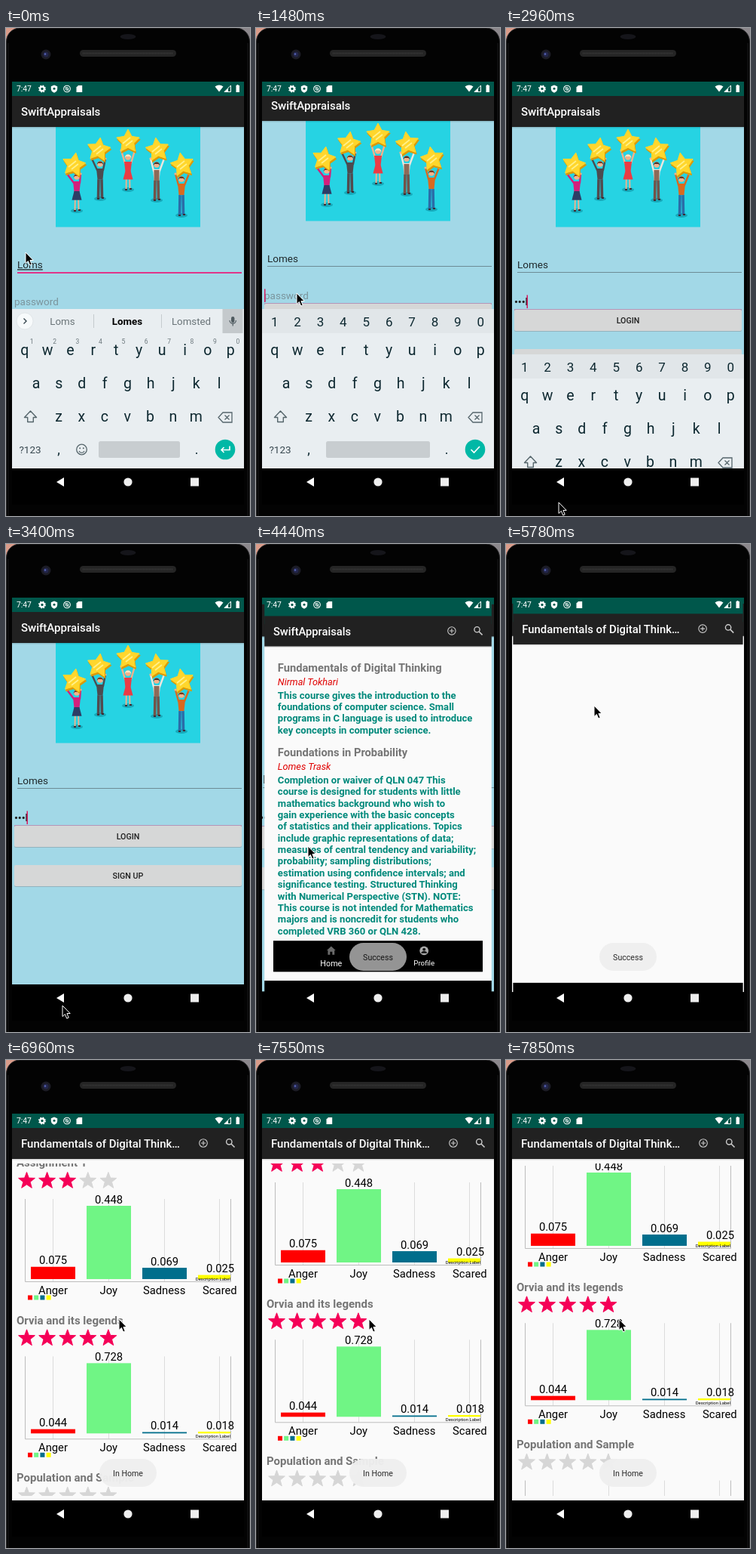
Write an HTML page that moves like this. It is 324 px wide and 646 px high and loops after 8 s.

```html
<!DOCTYPE html>
<html lang="en">
<head>
<meta charset="utf-8">
<title>Course feedback app</title>
<style>
html, body { margin: 0; width: 100%; height: 100%; overflow: hidden; background: #000; }
svg { display: block; width: 100%; height: 100%; font-family: Roboto, sans-serif; }
text { white-space: pre; }
</style>
</head>
<body>
<svg id="stage" viewBox="0 0 324 646"></svg>
<script>
const LOOP = 8000, TICK = 148;
const APP = 'SwiftAppraisals';

// ---- drawing helpers (text y is the visual middle of the line) ----
const text = (x, y, str, size, fill, more = '') =>
  `<text x="${x}" y="${y + size * 0.35}" font-size="${size}" fill="${fill}" ${more}>${str}</text>`;
const MID = 'text-anchor="middle"', BOLD = 'font-weight="700"', MEDIUM = 'font-weight="500"';
const rect = (x, y, w, h, fill, more = '') =>
  `<rect x="${x}" y="${y}" width="${w}" height="${h}" fill="${fill}" ${more}/>`;
const circle = (x, y, r, fill, more = '') => `<circle cx="${x}" cy="${y}" r="${r}" fill="${fill}" ${more}/>`;
const path = (d, fill, more = '') => `<path d="${d}" fill="${fill}" ${more}/>`;
const line = (d, color, w = 1, more = '') => path(d, 'none', `stroke="${color}" stroke-width="${w}" ${more}`);
const group = (id, body, more = '') => `<g id="${id}" ${more}>${body}</g>`;
const each = (list, fn) => [...list].map(fn).join('');

function star(x, y, r, fill, inner = 0.42, tilt = 0) {
  const pts = Array.from({ length: 10 }, (_, i) => {
    const a = (i * 36 - 90 + tilt) * Math.PI / 180, q = i % 2 ? r * inner : r;
    return (x + q * Math.cos(a)).toFixed(1) + ',' + (y + q * Math.sin(a)).toFixed(1);
  });
  return `<polygon points="${pts.join(' ')}" fill="${fill}" stroke="${fill}" stroke-width="1" stroke-linejoin="round"/>`;
}

// ---- phone ----
const phone = rect(0, 0, 162, 646, '#d99c8a') + rect(162, 0, 162, 646, '#8b878b') +
  rect(0.5, 0, 323, 680, '#030303', 'rx="18" stroke="#2c2c2e"') +
  line('M3 20V646M321 20V646', '#1b1b1d') +
  `<ellipse cx="162" cy="11.5" rx="10.5" ry="3.5" fill="#15151a"/>` +
  rect(98, 29, 128, 9, '#252525', 'rx="4.5"') + line('M102 33.5H222', '#3b3b3b', 2, 'stroke-dasharray="1 1"') +
  circle(53, 35, 6.5, '#1c1c25') + circle(53, 35, 3.5, '#23264a') + circle(52, 34.5, 1.3, '#5663b4');

// Bands overlap so that no seam shows while a window is scaled.
const appWindow = (id, title, bg, body, icons = '') => group(id,
  rect(8, 71, 308, 30, '#00574b') + rect(8, 125, 308, 460, bg) + rect(8, 583, 308, 60, '#000') + body +
  rect(8, 90, 308, 41, '#212121') + rect(8, 131, 308, 1.5, '#000', 'opacity=".12"') +
  text(20, 110.5, title, 15, '#fff', MEDIUM) + icons);

const barIcons = circle(262, 110, 5.3, 'none', 'stroke="#ccc" stroke-width="1.1"') +
  line('M262 107v6M259 110h6', '#ccc', 1.1) +
  circle(296.3, 108.3, 3.7, 'none', 'stroke="#ccc" stroke-width="1.4"') + line('M299 111l4.5 4.5', '#ccc', 1.6);

// ---- login screen ----
function person(x, head, foot, top, legs, hair, starX, starY, skirt, tilt) {
  const neck = head + 6, waist = neck + (foot - neck) * 0.36, hem = neck + (foot - neck) * 0.66;
  const skin = '#f3b18c', sleeve = top === legs ? skin : top;
  return `<ellipse cx="${x}" cy="${foot}" rx="8" ry="3" fill="#16a9ba"/>` +
    line(`M${x - 2} ${waist}L${x - 2.5} ${foot}M${x + 2} ${waist}L${x + 2.5} ${foot - 1}`, skirt ? skin : legs, skirt ? 1.8 : 3.6) +
    line(`M${x - 4} ${foot}h3M${x + 2} ${foot - 1}h3`, '#3a2d35', 2) +
    line(`M${x - 4} ${neck + 2}L${starX - 9} ${starY + 12}M${x + 4} ${neck + 2}L${starX + 9} ${starY + 12}`, sleeve, 2.4, 'stroke-linecap="round"') +
    circle(starX - 9, starY + 12, 1.6, skin) + circle(starX + 9, starY + 12, 1.6, skin) +
    path(`M${x - 5} ${neck}h10l-1.500 ${waist - neck}h-7z`, top) +
    (skirt ? path(`M${x - 3.5} ${waist - 1}h7l3 ${hem - waist}h-13z`, legs) : '') +
    circle(x, head, 3.8, skin) + path(`M${x - 4.3} ${head + 1}a4.3 4.6 0 0 1 8.600 0l-2 -2h-5z`, hair) +
    star(starX + 1, starY + 2.5, 16, '#dc9a08', 0.52, tilt) + star(starX, starY, 16, '#ffd62c', 0.52, tilt) +
    line(`M${starX - 7} ${starY + 3}l10 -8M${starX - 3} ${starY + 6}l9 -7`, '#fff08a', 1.8);
}
const picture = rect(66, 125, 192, 138.500, '#26d3e3') +
  person(94, 197, 242, '#d3207c', '#2d3d66', '#6b2b3a', 90, 181, true, 10) +
  person(125, 180, 226, '#4c4b50', '#514b4f', '#6a3f2b', 123, 161, false, 8) +
  person(162, 171, 214, '#ea3b45', '#ea3b45', '#f6e9c8', 162, 150, true, 0) +
  person(200, 181, 228, '#eee6df', '#71544a', '#4a332c', 201, 161, false, -8) +
  rect(196.5, 188, 7, 14, '#8d6a58') +
  person(233, 200, 248, '#d9691f', '#2a6da8', '#6b3a22', 234, 181, false, -10);

const button = (y, label, id) => rect(11, y + 0.5, 302, 28.5, '#93b3bd', 'rx="2"') +
  rect(11, y, 302, 28, '#d6d7d7', `rx="2" id="${id}"`) + text(162, y + 13.8, label, 10.7, '#1f1f1f', MID + ' ' + MEDIUM);

const login = appWindow('login', APP, '#a2d8e7', picture +
  text(15, 313.5, '', 13.5, '#20292c', 'id="user"') +
  rect(15, 323, 298, 1, '#6d8c95', 'id="userLine"') +
  text(11, 362.7, '', 13.5, '#222', 'id="pass"') +
  rect(11, 353.5, 1.5, 17.5, '#d81b60', 'id="caret"') +
  rect(11, 372.3, 302, 2, '#d81b60', 'id="passLine" opacity=".5"') +
  button(373, 'LOGIN', 'loginButton') + button(425, 'SIGN UP', 'signUpButton'));

// ---- keyboard ----
const INK = '#0d2830', keyX = i => 24.7 + i * 30.4;
const keyRow = (keys, x, y) => each(keys, (c, i) => text(x + i * 30.4, y, c, 19.5, INK, MID));
const keyboard = rect(8, 372, 308, 211, '#e9eef1') +
  keyRow('qwertyuiop', 24.7, 426.3) + keyRow('asdfghjkl', 40, 469.8) + keyRow('zxcvbnm', 70, 514.3) +
  line('M32.5 507l-8 8.5h4.2v6h7.6v-6h4.2z', '#56666c', 1.4, 'stroke-linejoin="round"') +
  line('M288 509h12v13h-12l-6 -6.5zM290.500 512.500l6 6m0 -6l-6 6', '#56666c', 1.3) +
  text(32, 558, '?123', 13.5, '#37474f', MID) + text(70, 558, ',', 18, INK, MID) + text(253, 558, '.', 18, INK, MID) +
  circle(291, 558, 13.3, '#00b8a6') +
  group('wordKeys',
    each('1234567890', (c, i) => text(keyX(i) + 9.5, 415, c, 8.5, '#6b777c', MID)) +
    circle(25, 388, 11, '#f7fafb', 'stroke="#d5dadd" stroke-width=".6"') + line('M23.500 384.500l3.500 3.500l-3.500 3.500', '#37474f', 1.4) +
    text(75, 388.5, '', 13.3, '#6a7478', MID + ' id="hint0"') + text(161, 388.5, '', 13.3, '#000', MID + ' ' + BOLD + ' id="hint1"') +
    text(246, 388.5, '', 13.3, '#6a7478', MID + ' id="hint2"') +
    line('M116.5 379v18M206.5 379v18', '#c5cbce') + rect(287.5, 372, 27, 32, '#c4c9cc') +
    rect(299, 382, 4.4, 8, '#4f5b60', 'rx="2.2"') + line('M297 387a4.200 4.200 0 0 0 8.400 0M301.200 391.500v3', '#4f5b60', 1.2) +
    circle(100.5, 558, 6.8, 'none', 'stroke="#56666c" stroke-width="1.3"') + circle(98.2, 556.3, 1, '#56666c') + circle(102.8, 556.3, 1, '#56666c') +
    line('M97 560a3.800 3.800 0 0 0 7 0', '#56666c', 1.2) + rect(123, 547, 108, 22, '#c8cdd0', 'rx="2.5"') +
    line('M297 553.500v5h-11m3.500 -3.500l-3.500 3.500l3.500 3.500', '#fff', 1.6)) +
  group('passKeys', rect(8, 372, 308, 32, '#e1e6e9') +
    each('1234567890', (c, i) => text(keyX(i), 388.7, c, 17, INK, MID)) + rect(93, 547, 138, 22, '#c8cdd0', 'rx="2.5"') +
    line('M285.500 558l4 4l7.500 -8', '#fff', 1.7));

// ---- course list ----
const courses = [
  [160, 'Fundamentals of Digital Thinking', 'Nirmal Tokhari', [
    'This course gives the introduction to the', 'foundations of computer science. Small',
    'programs in C language is used to introduce', 'key concepts in computer science.']],
  [274.5, 'Foundations in Probability', 'Lomes Trask', [
    'Completion or waiver of QLN 047 This', 'course is designed for students with little',
    'mathematics background who wish to', 'gain experience with the basic concepts',
    'of statistics and their applications. Topics', 'include graphic representations of data;',
    'measures of central tendency and variability;', 'probability; sampling distributions;',
    'estimation using confidence intervals; and', 'significance testing. Structured Thinking',
    'with Numerical Perspective (STN). NOTE:', 'This course is not intended for Mathematics',
    'majors and is noncredit for students who', 'completed VRB 360 or QLN 428.']]
];
const courseCard = ([y, name, teacher, about]) => text(26, y, name, 15, '#757575', BOLD) +
  text(26, y + 19.4, teacher, 13, '#e00000', 'font-style="italic"') +
  each(about, (s, i) => text(26, y + 37 + i * 15.7, s, 13.35, '#00897b', BOLD));
const tabs = rect(20, 529, 284, 42, '#000') +
  path('M92.500 542l6 -5.500l6 5.500h-1.500v6h-3v-4h-3v4h-3v-6z', '#6a6a6a') + text(98.5, 559.5, 'Home', 11, '#fff', MID) +
  circle(224.5, 542.5, 6, '#aaa') + circle(224.5, 540.7, 2, '#111') + path('M220.500 546a4 3 0 0 1 8 0z', '#111') +
  text(224.5, 559.5, 'Profile', 10, '#fff', MID);
const home = appWindow('home', APP, '#fafafa', each(courses, courseCard) + tabs, barIcons);

// ---- feedback charts ----
const MOODS = [['Anger', '#f00'], ['Joy', '#70f585'], ['Sadness', '#006e8c'], ['Scared', '#ff0']];
const reviews = [
  { name: 'Assignment 1', stars: 3, base: 154, scale: 216.5, values: [0.075, 0.448, 0.069, 0.025] },
  { name: 'Orvia and its legends', stars: 5, base: 150, scale: 127.7, values: [0.044, 0.728, 0.014, 0.018] },
  { name: 'Population and Sample', stars: 0, values: [] }
];
function review({ name, stars, base, scale, values }, i) {
  const axis = 157;
  const bars = each(values, (v, j) => {
    const x = 33 + j * 74, h = v * scale;
    return rect(x, base - h, Math.min(59, 298 - x), h, MOODS[j][1]) +
      text(x + 29.5, base - h - 8.5, v.toFixed(3), 14.8, '#000', MID);
  });
  return `<g transform="translate(0 ${149 + i * 208.3})">` +
    text(14, 0, name, 15, '#757575', BOLD) +
    each('01234', (_, j) => star(27.5 + j * 27.1, 24, 11.5, j < stars ? '#f50057' : '#d6d6d6')) +
    line(`M62.5 48V${axis}M136.500 48V${axis}M210.500 48V${axis}M283.500 48V${axis}`, '#dcdcdc') +
    line(`M25.5 48V${axis + 0.5}H298.500V48`, '#bdbdbd') + bars +
    text(298, axis - 3.5, 'Description Label', 6, '#000', 'text-anchor="end"') +
    each(MOODS, ([mood, color], j) => text(62.5 + j * 73.8, axis + 12, mood, 14.8, '#000', MID) +
      rect(29 + j * 8.2, axis + 18.5, 6, 6, color)) + '</g>';
}
const detail = appWindow('detail', 'Fundamentals of Digital Think…', '#fafafa',
  `<g clip-path="url(#listClip)">${group('list', reviews.map(review).join(''))}</g>`, barIcons);

// ---- system layer ----
const statusIcons = text(14, 80.5, '7:47', 10.3, '#fff') +
  circle(48, 80.5, 2.8, 'none', 'stroke="#fff" stroke-width="2.2"') + circle(48, 80.5, 4.3, 'none', 'stroke="#fff" stroke-width="1.4" stroke-dasharray="1.7 1.7"') +
  path('M64 75.500l4.200 1.800v3q0 4 -4.200 5.500q-4.200 -1.500 -4.200 -5.500v-3z', '#fff') + circle(64, 80.3, 1.5, '#00574b') +
  circle(81, 80.5, 4.3, 'none', 'stroke="#fff" stroke-width="1.1"') + circle(81, 80.5, 1.8, 'none', 'stroke="#fff"') + line('M78 77.500l6 6', '#fff') +
  path('M96 76h5.200v9h-7.700v-6.500z', '#fff') +
  path('M277.500 77.500q5.500 -4 11 0l-5.500 7z', '#fff') + line('M298.500 76v8.500h-8.500z', '#fff') + path('M295 80v4.500h-5z', '#fff') +
  path('M305.500 76h1v-1h2v1h1.500v9h-4.500z', '#fff');
const navIcons = path('M67 601l10 -6v12z', '#fff') + circle(162, 601, 5.6, '#eee') + rect(245, 595.5, 11, 11, '#eee');
const toast = group('toast', rect(124, 528, 76, 37, '#efefef', 'rx="18.5"') + text(162, 547, '', 10.6, '#222', MID + ' id="toastText"'));
const pointer = group('pointer', path('M0 0V14.500L3.400 11.400L5.700 17L8.200 16L5.900 10.500H10.200Z', '#000', 'stroke="#fff" stroke-width="1"'));

const clip = (id, x, y, w, h) => `<clipPath id="${id}">${rect(x, y, w, h, '#000')}</clipPath>`;
stage.innerHTML = `<defs>${clip('screenClip', 8, 71, 308, 560)}${clip('listClip', 8, 137, 308, 440)}${clip('keyClip', 8, 131, 308, 452)}</defs>` +
  phone + `<g clip-path="url(#screenClip)">${login}${home}${detail}</g>` +
  `<g clip-path="url(#keyClip)">${group('keyboard', keyboard)}</g>` +
  group('statusCover', rect(8, 71, 308, 19, '#00574b')) + statusIcons + navIcons + toast + pointer;

// ---- motion, in ticks ----
const $ = Object.fromEntries([...stage.querySelectorAll('[id]')].map(el => [el.id, el]));
const set = (id, name, value) => $[id].setAttribute(name, value);
const show = (id, on) => set(id, 'visibility', on ? 'inherit' : 'hidden');

// Linear track through [tick, value...] points.
function track(points, k, col = 1) {
  const i = points.findIndex(p => p[0] > k);
  if (i < 0) return points[points.length - 1][col];
  if (i === 0) return points[0][col];
  const a = points[i - 1], b = points[i];
  return a[col] + (b[col] - a[col]) * (k - a[0]) / (b[0] - a[0]);
}
const POINTER = [[0, 26, 297], [6, 26, 297], [8, 54, 351], [15, 54, 351], [18, 64, 622], [19, 66, 630], [20, 70, 628],
  [23, 75, 611], [25, 69, 400], [30, 69, 400], [33, 68, 363], [36, 117, 214], [40, 117, 214], [44, 150, 343]];
const SCROLL = [[46, 0], [47, 13], [48, 22], [49, 26], [50, 26], [51, 35], [52, 48], [53, 57]];
const TOAST = [[28, 0], [30, 0.62], [31, 0.96], [42, 0.96], [44, 0], [45, 0.96]];
const KEYBOARD_Y = [[19, 0], [20, 60], [21, 170], [22, 215]];

const zoom = s => `translate(162 347) scale(${s}) translate(-162 -347)`;
function openWindow(id, below, start, k) {
  const left = 0.35 ** (k - start);
  set(id, 'transform', zoom(1 - 0.171 * left));
  set(id, 'opacity', Math.min(1, (k - start + 0.6) / 2));
  set(below, 'transform', zoom(1 + 0.045 * (1 - left)));
}

function draw(k) {
  const inPassword = k >= 9, panned = inPassword && k < 20;
  const user = k < 2 ? 'Loms' : k < 4 ? 'Lom' : k < 5 ? 'Lome' : 'Lomes';
  const typed = k < 12 ? 0 : Math.min(4, Math.floor((k - 10) / 2));

  $.user.textContent = user;
  set('user', 'text-decoration', inPassword ? 'none' : 'underline');
  set('userLine', 'fill', inPassword ? '#6d8c95' : '#e0358a');
  set('userLine', 'height', inPassword ? 1 : 2);
  $.pass.textContent = typed ? '•'.repeat(typed - 1) + 'il'[(typed + 1) % 2] : 'password';
  set('pass', 'fill', typed ? '#222' : '#7b949c');
  set('pass', 'font-weight', typed ? 700 : 400);
  set('caret', 'x', typed ? 9.5 + typed * 4.5 : 11);
  show('caret', inPassword);
  show('passLine', inPassword);
  set('loginButton', 'fill', k === 27 || k === 28 ? '#c3c5c5' : '#d6d7d7');

  const hints = k < 2 ? ['Loms', 'Lomes', 'Lomsted'] : k < 4 ? ['Lom', 'Loms', 'Lomes'] : [user, 'Lomes', 'Lomesby'];
  hints.forEach((h, i) => { $['hint' + i].textContent = h; });
  show('wordKeys', !inPassword);
  show('passKeys', inPassword);
  show('keyboard', k < 22);
  set('keyboard', 'transform', `translate(0 ${track(KEYBOARD_Y, k)})`);

  set('login', 'transform', panned ? 'translate(0 -8)' : '');
  show('statusCover', k < 28);
  show('login', k < 38);
  show('home', k >= 28);
  show('detail', k >= 38);
  if (k >= 28 && k < 38) openWindow('home', 'login', 28, k);
  if (k >= 38) openWindow('detail', 'home', 36.2, k);

  show('list', k >= 42);
  set('list', 'transform', `translate(0 ${-track(SCROLL, k)})`);
  $.toastText.textContent = k < 44 ? 'Success' : 'In Home';
  set('toast', 'opacity', track(TOAST, k));
  set('pointer', 'transform', `translate(${track(POINTER, k)} ${track(POINTER, k, 2)})`);
}

// The screen advances in whole ticks.
function frame() {
  draw(Math.min(53, Math.floor((performance.now() % LOOP + 8) / TICK)));
  requestAnimationFrame(frame);
}
frame();
</script>
</body>
</html>
```
